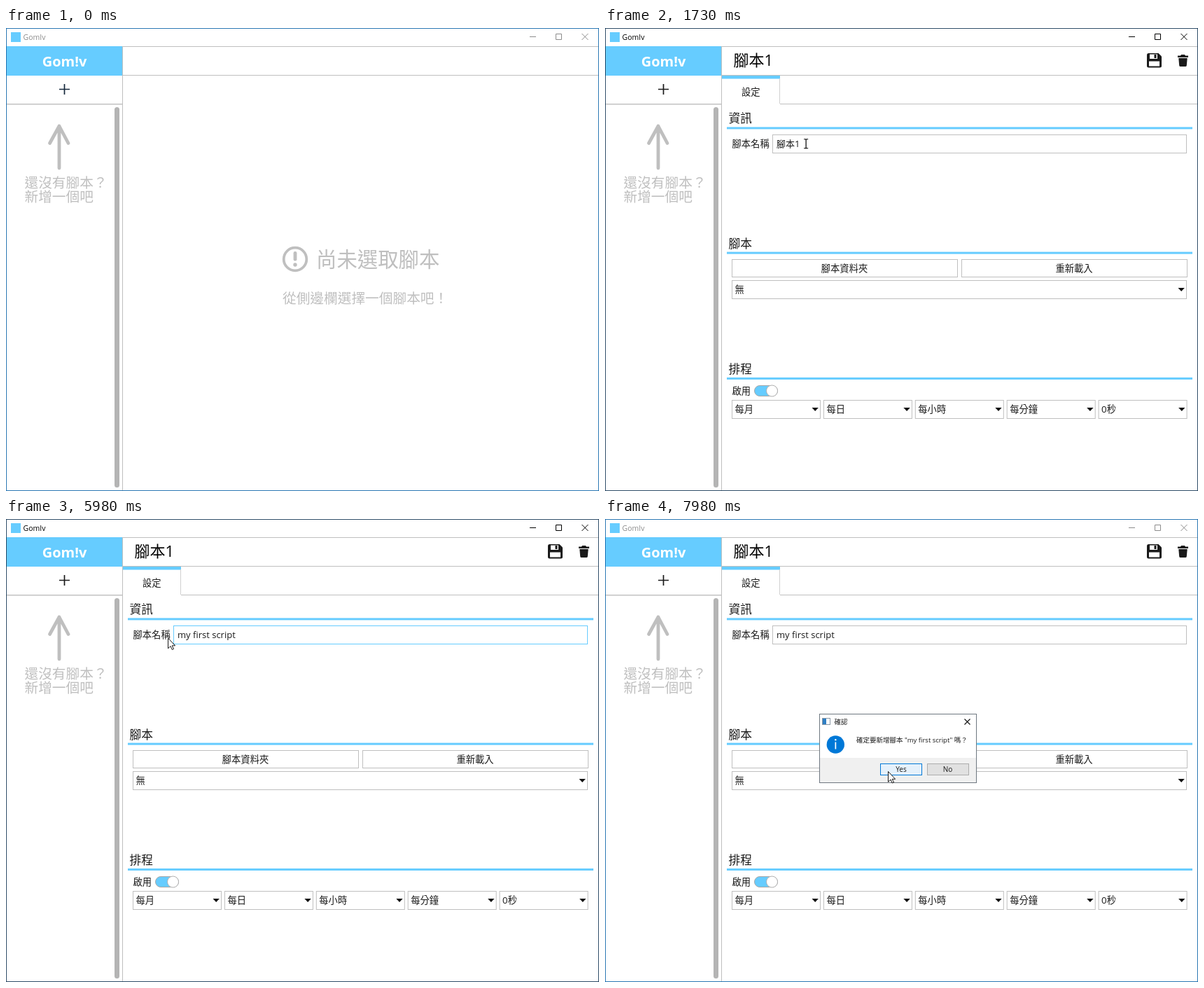
Animation, 847 px wide and 661 px high, one loop 8 s. Source, as an HTML page:

```html
<!DOCTYPE html>
<html lang="zh-Hant">
<head>
<meta charset="utf-8">
<style>
html, body { margin: 0; width: 100%; height: 100%; overflow: hidden; background: #fff; }
svg { display: block; }
text { font-family: "Open Sans", "Noto Sans CJK TC", "Noto Sans CJK", sans-serif; white-space: pre; }
</style>
</head>
<body>
<svg id="stage" width="847" height="661" viewBox="0 0 847 661"></svg>
<script>
const BLUE = '#66ccff', GREY = '#bfbfbf', INK = '#1a1a1a', GREEN = '#6fb679';
const stage = document.getElementById('stage');

const rect = (x, y, w, h, fill, more = '') =>
  `<rect x="${x}" y="${y}" width="${w}" height="${h}" fill="${fill}" ${more}/>`;
const box = (x, y, w, h, fill = '#fff', line = GREY, more = '') =>
  rect(x + .5, y + .5, w - 1, h - 1, fill, `stroke="${line}" ${more}`);
const path = (d, stroke, width = 1, more = '') =>
  `<path d="${d}" fill="none" stroke="${stroke}" stroke-width="${width}" ${more}/>`;
const shape = (d, fill, more = '') => `<path d="${d}" fill="${fill}" ${more}/>`;
const label = (x, baseline, size, str, fill = INK, more = '') =>
  `<text x="${x}" y="${baseline}" font-size="${size}" fill="${fill}" ${more}>${str}</text>`;
// Chinese text placed by its vertical middle
const han = (x, mid, size, str, fill, more) => label(x, mid + size * .38, size, str, fill, more);
const middle = 'text-anchor="middle"';

const section = (y, title) => han(176.5, y, 16.7, title) + rect(174, y + 12.4, 665, 3, BLUE);
const combo = (x, y, w, str) => box(x, y, w, 27) + han(x + 4.5, y + 13.3, 13.3, str) +
  shape(`M${x + w - 12.5} ${y + 11}h9.4l-4.7 5z`, '#111');
const button = (x, str) => box(x, 330, 323, 26) + han(x + 161, 343, 13.3, str, INK, middle);

const frame = `
  ${rect(7, 6, 14, 14, BLUE)}
  <g id="caption">${label(24.5, 17, 10.5, 'GomIv', 'currentColor')}
    ${path('M748 12.5h9M785.5 8.5h8v8h-8zM822.5 8l9 9M831.5 8l-9 9', 'currentColor')}</g>
  ${path('M167 26.5H846M167 67.5H846M166.5 26V660', GREY)}
  ${rect(1, 26, 165, 42, BLUE)}
  ${label(83.5, 55, 20, 'Gom!v', '#fff', middle + ' font-weight="700"')}
  ${path('M83.5 80V95M76 87.5H91', 'currentColor', 1.7, 'id="plus"')}
  ${path('M1 108.5H166', GREY)}${path('M1 109.5H166', '#e4e4e4')}
  ${rect(155, 113, 7, 543, '#b4b4b4', 'rx="3.5"')}
  ${path('M76 140V200M62.5 164.5L76 140L89 164.5', GREY, 4.8, 'stroke-linecap="round" stroke-linejoin="round"')}
  ${han(26.5, 220.5, 19.7, '還沒有腳本？', GREY)}
  ${han(26.5, 240.5, 19.7, '新增一個吧', GREY)}`;

const empty = `<g id="empty">
  <circle cx="413" cy="330" r="16.3" fill="none" stroke="${GREY}" stroke-width="3.8"/>
  ${rect(410.6, 319, 4.8, 13.5, GREY, 'rx="2.2"')}<circle cx="413" cy="338" r="2.7" fill="${GREY}"/>
  ${han(443, 330, 29.4, '尚未選取腳本', GREY)}
  ${han(395, 386, 19.7, '從側邊欄選擇一個腳本吧！', GREY)}</g>`;

const schedule = ['每月', '每日', '每小時', '每分鐘', '0秒']
  .map((str, i) => combo(181 + i * 130.9, 531, 127, str)).join('');

const editor = `<g id="editor">
  ${han(183.5, 46, 22, '腳本1', '#000', 'font-weight="500"')}
  <g id="save">
    ${shape('M776.5 36H790.5L795 40.5V54q0 2.5-2.5 2.5H776.5q-2.5 0-2.5-2.5V38.500q0-2.500 2.500-2.500z', 'currentColor')}
    ${rect(778, 37.5, 11, 6.5, '#fff')}${rect(784.5, 38, 3, 5, 'currentColor')}${rect(777, 47.5, 15, 7, '#fff')}</g>
  ${shape('M823 38h5l1 1.500h4v2.500H818v-2.500h4zM819.300 43h12.400l-.9 10.500q-.2 1.500-1.700 1.500h-7.200q-1.500 0-1.700-1.500z', INK)}
  ${rect(167, 68, 83, 4.5, BLUE)}
  ${path('M249.5 72V108', '#d0d0d0')}${path('M250 108.5H846', GREY)}
  ${han(208.3, 91, 13.3, '設定', INK, middle)}
  ${section(129, '資訊')}${section(307.2, '腳本')}${section(486.500, '排程')}
  ${han(181.5, 165.3, 13.3, '腳本名稱')}
  ${box(239, 152, 592, 27, '#fff', GREY, 'id="field"')}
  ${rect(245, 157, 34, 17, '#99c9ef', 'id="picked"')}
  ${label(245, 170, 13, '', INK, 'id="name"')}
  ${rect(0, 157, 1.2, 17, '#000', 'id="caret"')}
  ${button(181, '腳本資料夾')}${button(509, '重新載入')}
  ${combo(181, 360, 650, '無')}
  ${han(181.5, 518, 13.3, '啟用')}
  ${box(213, 510, 34, 16, BLUE, '#a8a8a8', 'rx="7.5"')}
  <circle cx="238.500" cy="518" r="8" fill="#fff" stroke="#b0b0b0"/>
  ${schedule}</g>`;

const dialog = `<g id="dialog">
  ${box(306, 278, 225, 99, '#fff', '#6e7780')}
  ${rect(307, 341, 223, 35, '#f0f0f0')}
  ${box(310, 284, 12, 10, '#fff', '#8a98a5')}${rect(311, 285, 5, 8, '#2f7fc4')}
  ${han(327.5, 289, 9.5, '確認')}
  ${path('M513.5 285.500l8 8M521.500 285.500l-8 8', '#111', 1.1)}
  <circle cx="329.3" cy="322" r="12.7" fill="#0078d7"/>
  ${rect(328.500, 318.500, 1.700, 10, '#fff')}<circle cx="329.300" cy="315.300" r="1.200" fill="#fff"/>
  ${label(359, 319, 9.5, '確定要新增腳本 "my first script" 嗎？')}
  ${box(393, 349, 60, 17, '#e1e1e1', '#0078d7', 'id="yes"')}${label(423, 361, 10, 'Yes', INK, middle)}
  ${box(460, 349, 60, 17, '#e1e1e1', '#adadad')}${label(489.500, 361, 10, 'No', INK, middle)}</g>`;

const pointers =
  shape('M.5 .5V15.300L4 12L6.300 17L8.500 16L6.200 11.300H10.600z', '#fff', 'id="arrow" stroke="#000" stroke-width=".9"') +
  path('M-3 -6.500h2q1 0 1 1V5.500q0 1-1 1h-2M3 -6.500h-2q-1 0-1 1M3 6.500h-2q-1 0-1-1', '#000', 1.2, 'id="beam"');

stage.innerHTML = rect(0, 0, 847, 661, '#fff') + frame + empty + editor + dialog +
  box(0, 0, 847, 661, 'none', '#2b77b3', 'id="border"') + pointers;

const el = {};
stage.querySelectorAll('[id]').forEach(node => el[node.id] = node);
const show = (node, on) => node.style.display = on ? '' : 'none';

const STEP = 80, PRESS = 950, OPEN = 1040, DRAG = 1890, RELEASE = 2130, ASK = 7340;
// pointer moves: start time, number of steps, end point
const moves = [
  [150, 9, 97, 100], [1340, 6, 301, 170], [DRAG, 3, 226, 170],
  [RELEASE, 1, 231, 169.500], [6510, 7, 783, 46], [ASK + STEP, 8, 404, 360]
];
const phrase = 'my first script';
const keyTimes = [2750, 2830, 2990, 3220, 3300, 3450, 3690, 4070, 4460, 4620, 4810, 5030, 5190, 5270, 5360];

function pointerAt(t) {
  let x = 640, y = 548;
  for (const [start, steps, toX, toY] of moves) {
    if (t < start) break;
    const p = Math.min(1, (Math.floor((t - start + 4) / STEP) + 1) / steps);
    const e = 1 - (1 - p) ** 1.5;
    x += (toX - x) * e;
    y += (toY - y) * e;
  }
  return [x, y];
}

function draw(t) {
  const [x, y] = pointerAt(t);
  const over = (l, top, r, b) => x >= l && x < r && y >= top && y < b;
  const active = t >= PRESS && t < ASK, open = t >= OPEN;
  const dragging = t >= DRAG && t < RELEASE;
  const focused = t >= DRAG && t < ASK;

  el.caption.style.color = active ? '#000' : '#8c8c8c';
  el.border.setAttribute('stroke', active ? '#2f4d68' : '#2b77b3');
  el.plus.style.color = t >= 70 && over(1, 68, 166, 108) ? GREEN : open ? INK : '#16283c';
  show(el.empty, !open);
  show(el.editor, open);
  show(el.dialog, t >= ASK);
  el.save.style.color = t < ASK && over(770, 32, 799, 60) ? GREEN : INK;
  el.yes.setAttribute('fill', over(393, 349, 453, 366) ? '#e5f1fb' : '#e1e1e1');

  const typed = keyTimes.filter(k => k <= t).length;
  el.name.textContent = typed ? phrase.slice(0, typed) : '腳本1';
  el.field.setAttribute('stroke', focused ? BLUE : GREY);

  const from = x < 251 ? 245 : x < 265 ? 258 : x < 276 ? 272 : 279;
  el.picked.setAttribute('x', from);
  el.picked.setAttribute('width', 279 - from);
  show(el.picked, focused && !typed);

  const blinkOff = t >= 2360 && t < 2750 || t >= 5980 && t < 6510 || t >= 7150;
  show(el.caret, focused && !blinkOff);
  el.caret.setAttribute('x', typed ? 245 + el.name.getComputedTextLength() : from);

  const beam = dragging || open && t < ASK && over(239, 152, 831, 179);
  show(el.arrow, t >= 70 && !beam);
  show(el.beam, beam);
  for (const p of [el.arrow, el.beam]) p.setAttribute('transform', `translate(${x} ${y})`);
}

function loop() {
  draw(performance.now() % 8000);
  requestAnimationFrame(loop);
}
loop();
</script>
</body>
</html>
```
